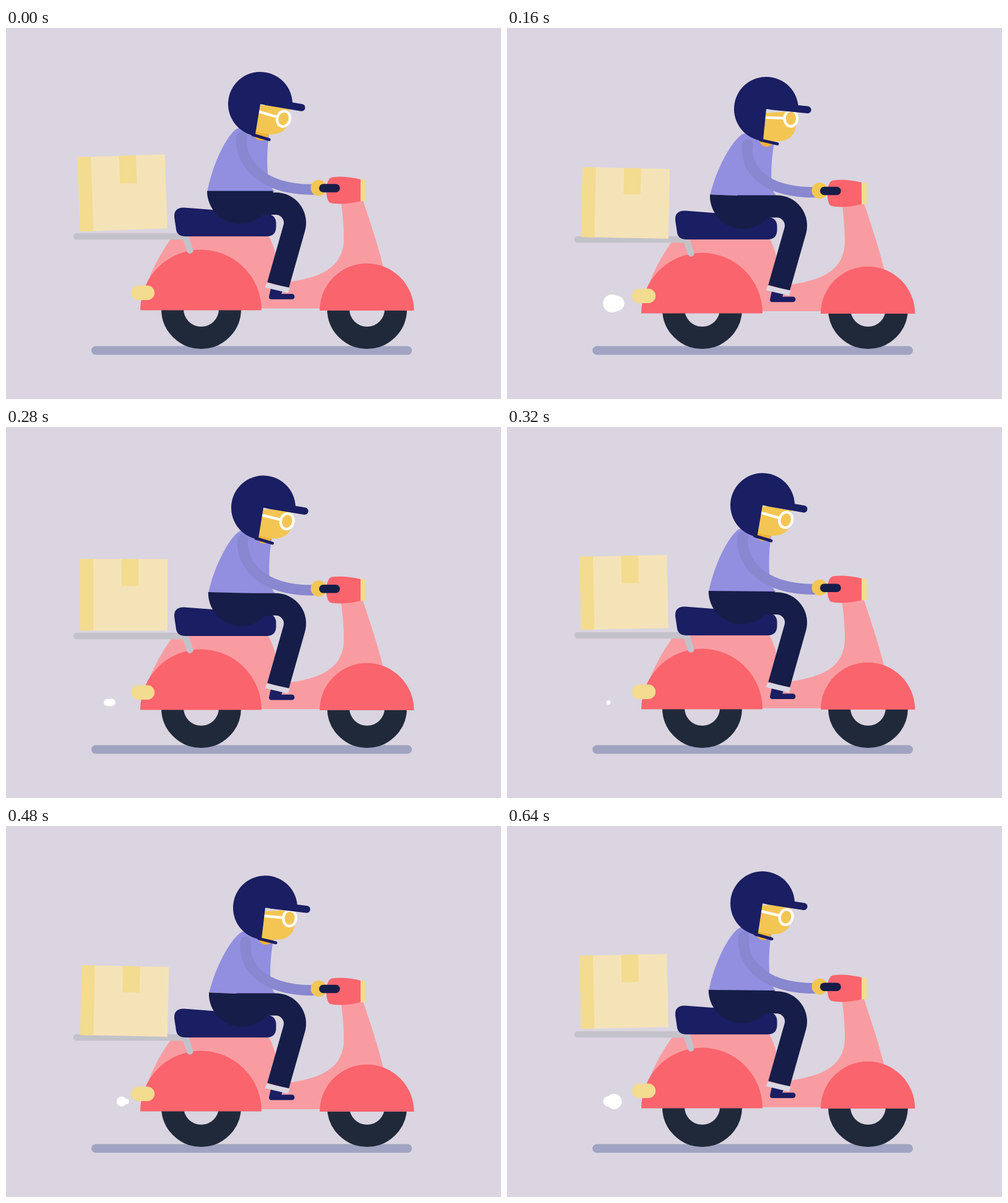
Recreate the animation shown at these times as an HTML page. Size 800 by 600 pixels, loop 680 ms.

```html
<!DOCTYPE html>
<html lang="en">
<head>
<meta charset="utf-8">
<title>Scooter delivery</title>
<style>
html, body { margin: 0; width: 100%; height: 100%; overflow: hidden; background: #dad5e0; }
svg { display: block; width: 800px; height: 600px; }
.red { fill: #fa646d; }
.navy { fill: #1a1e62; }
.pants { fill: #161d48; }
.skin { fill: #f3c653; }
.tape { fill: #f3db8f; }
.line { fill: none; stroke-linecap: round; stroke-linejoin: round; }
</style>
</head>
<body>
<svg viewBox="0 0 800 600">
  <path class="line" d="M145 521.5H649" stroke="#a0a3c1" stroke-width="14"/>
  <g fill="none" stroke="#20293a" stroke-width="36">
    <circle cx="315.5" cy="454.5" r="46.5"/>
    <circle cx="583.5" cy="454.5" r="46.5"/>
  </g>
  <g fill="#fff">
    <circle id="puff1" cy="445.5"/>
    <circle id="puff2" cy="445.5"/>
  </g>

  <path id="frame" fill="#f99ca1" d="M272 334H423C436 355 441 385 440 413L461 410C505 403 546 390 546 340C546 320 544 300 541 276H576C590 318 604 360 611 392L600 453.5H230L226 420C235 390 255 355 272 334Z"/>

  <g id="scooter">
    <path class="red" d="M217 456.5A98 98 0 0 1 413 456.5ZM507 457A76.2 76.2 0 0 1 659.4 457Z"/>
    <path class="line" d="M114 337H290L297.3 359.5" stroke="#c3c2ca" stroke-width="10.5"/>
    <path class="line" d="M213.8 428.2H228.4" stroke="#f3db8f" stroke-width="23.5"/>
    <path class="navy" d="M288 290.5L425 301Q436.5 304 436.5 316V321Q436.5 337 421 337H290Q277 337 275 326L272 306Q271 290 288 290.5Z"/>
    <path class="red" d="M573.5 245C557 241 541 239.500 527 241.500C515 243 515 281 525 283C540 286 557 284 573.5 280Z"/>
    <path class="tape" d="M573 244.700L581.500 245.500V279.500L573 280.500Z"/>
  </g>

  <g id="box">
    <path fill="#f5e3b8" d="M-70.500 -120H70.500V0H-70.500Z"/>
    <path class="tape" d="M-70.500 -120H-49V0H-70.500ZM-3.500 -120H24V-75H-3.500Z"/>
  </g>

  <g id="torso">
    <path fill="#928fe0" d="M325.500 264C333 225 352 182 369 166C378 157 400 158 425 172C422 195 421 222 424 245C426 255 430 259 434 265Z"/>
    <ellipse cx="412.500" cy="168" rx="13" ry="14" fill="#f2b236"/>
  </g>
  <path id="hip" class="pants" d="M325 263.500H431.500A53.200 53.200 0 0 1 325 263.500Z"/>
  <g id="leg">
    <path class="navy" d="M428 421L447 425L445 430H462A4.400 4.400 0 0 1 462 438.800H429Q425 438.800 425 434.500Z"/>
    <path d="M372 284H436A31 31 0 0 1 465.800 323.500L439.600 416" fill="none" stroke="#161d48" stroke-width="36"/>
    <path fill="#dad7e3" d="M421.500 412L458.500 420L456 428.500L418.500 419.500Z"/>
  </g>
  <path id="arm" fill="none" stroke="#8887d0" stroke-width="17" stroke-linecap="round"/>
  <g id="grip">
    <circle class="skin" cx="505.500" cy="258.500" r="13"/>
    <path class="line" d="M512.700 259H533" stroke="#161d48" stroke-width="13.500"/>
  </g>

  <g id="face">
    <path class="skin" d="M404 125H455C462 140 460 172 429 172C418 172 410 169.500 402 167Z"/>
  </g>
  <g id="glasses" stroke="#fff" stroke-width="4.300">
    <path d="M-45 0H-10"/>
    <ellipse class="skin" rx="10.300" ry="12.700"/>
  </g>
  <g id="helmet">
    <path class="navy" d="M411 123L402.500 174.300A52 52 0 1 1 462.300 131.300Z"/>
    <path class="line" d="M420 119L477.700 128.700" stroke="#1a1e62" stroke-width="11.600"/>
    <path class="line" d="M398.800 172.600L425.300 180.500" stroke="#1a1e62" stroke-width="4.800"/>
  </g>
</svg>
<script>
const LOOP = 680, STEP = 40, HALF = 160;
const el = id => document.getElementById(id);
const move = (id, value) => el(id).setAttribute('transform', value);

// gently eased 0 -> 1 -> 0, one bounce every 320 ms
function bounce(t) {
  const p = (t % (2 * HALF)) / HALF;
  const x = p > 1 ? 2 - p : p;
  return (x + x * x * (3 - 2 * x)) / 2;
}

// linear interpolation through [time, value] pairs
function key(t, pts) {
  for (let i = 1; i < pts.length; i++) {
    const [a, va] = pts[i - 1], [b, vb] = pts[i];
    if (t <= b) return va + (vb - va) * (t - a) / (b - a);
  }
  return pts[pts.length - 1][1];
}

function puff(id, t, x, r) {
  el(id).setAttribute('cx', key(t, x));
  el(id).setAttribute('r', key(t, r));
}

function draw(t) {
  // each part rests for one step at a different moment of the loop
  const ride = t < 640 ? bounce(t) : 0;
  const body = t < 40 ? 0 : bounce(t - 40);
  const nod = t < 320 ? bounce(t) : t < 360 ? 0 : bounce(t - 40);
  const sink = 5.6 * body;

  move('scooter', `translate(0 ${5 * ride})`);
  for (const id of ['frame', 'leg', 'grip']) move(id, `translate(0 ${sink})`);
  move('box', `translate(190.3 ${326.5 + 13 * ride}) rotate(${-2 + 4 * body}) scale(1 ${1 - 0.073 * body})`);

  // lean and squash, hinged at the waist (378, 264)
  move('torso', `translate(${378 + 3.7 * body} ${264 + 9 * body}) ` +
    `matrix(1 ${0.05 * body} ${-0.06 * body} ${1 - 0.02 * body} 0 0) translate(-378 -264)`);
  move('hip', `translate(${3.7 * body} ${10 * body}) rotate(${3 * body} 378 263.5)`);

  const sx = 381 + 1.2 * body + 7 * nod, sy = 176 + 8.75 * body + 5 * nod;
  el('arm').setAttribute('d',
    `M${sx} ${sy}C${sx - 5} ${sy + 29} ${400 + 3 * nod} ${261.5 + sink} 497 ${261.3 + sink}`);

  const hx = 10 * body, hy = 17.5 * body - 6 * nod;
  const tilt = `rotate(${1.6 * body - 5 * nod} 411 123)`;
  move('helmet', `translate(${hx} ${hy}) ${tilt}`);
  move('face', `translate(${hx} ${hy + 4.5 * nod}) ${tilt}`);
  move('glasses', `translate(${448.5 + 11 * body + 1.5 * nod} ${146.8 + 17 * body - 14 * nod}) ` +
    `rotate(${16 + 1.5 * body - 15 * nod})`);

  const p = t % 400;
  puff('puff1', p, [[0, 204], [160, 169.7], [240, 164], [400, 164]],
    [[0, 0], [120, 12], [160, 14.5], [240, 8.5], [320, 3.6], [360, 0]]);
  puff('puff2', p, [[40, 204], [160, 177], [240, 173], [320, 168]],
    [[0, 0], [40, 0], [160, 12.5], [200, 14], [240, 12.5], [320, 0]]);
}

const start = performance.now();
function tick() {
  const t = (performance.now() - start) % LOOP;
  draw(Math.floor((t + 0.01) / STEP) * STEP % LOOP);
  requestAnimationFrame(tick);
}
tick();
</script>
</body>
</html>
```
